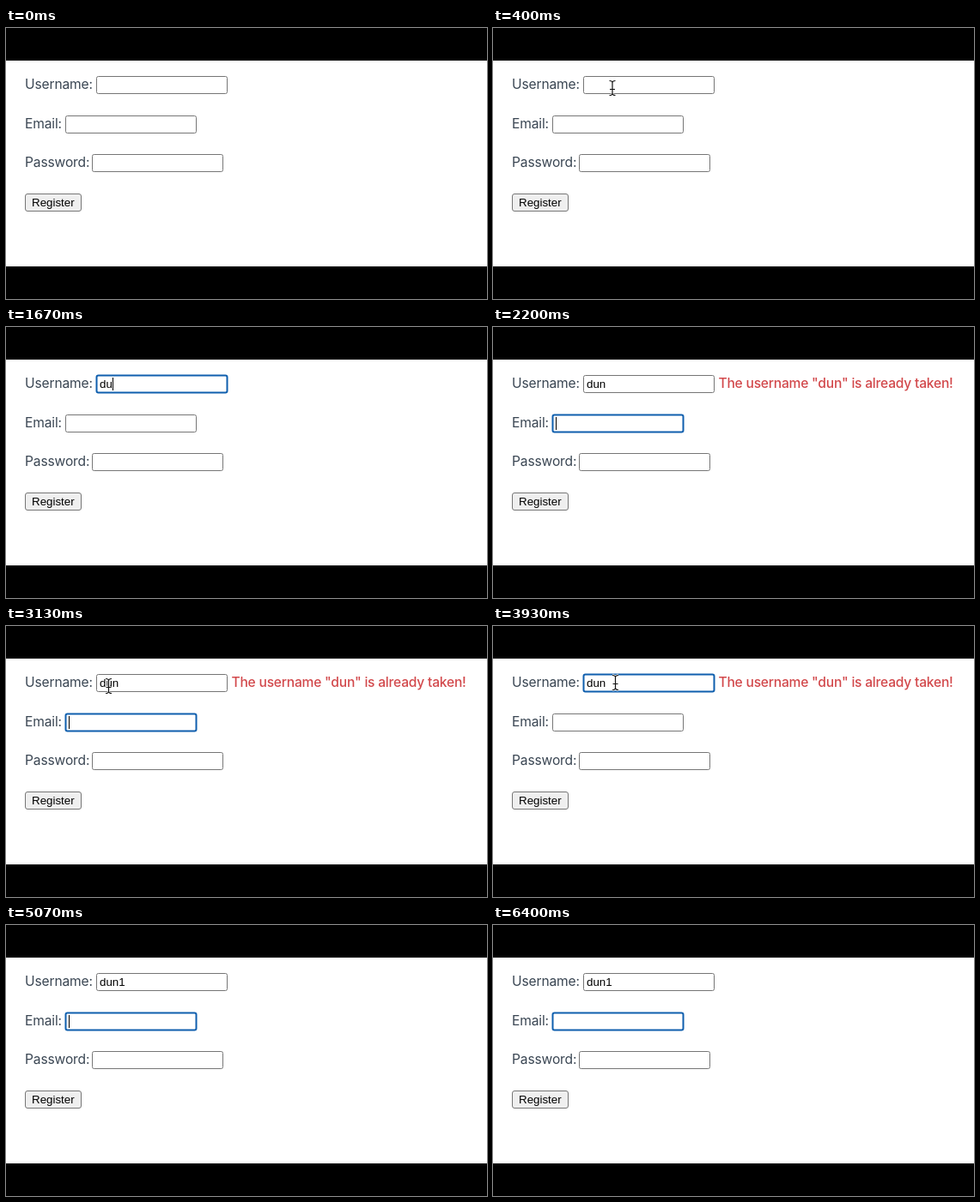
Write an HTML page that moves like this. It is 560x316 px and loops after 6.8 s.

```html
<!DOCTYPE html>
<html lang="en">
<head>
<meta charset="utf-8">
<title>Register form</title>
<style>
html, body { margin: 0; width: 100%; height: 100%; overflow: hidden; background: #000; }
svg { display: block; width: 560px; height: 316px; }
.label { font: 15.6px Inter, sans-serif; letter-spacing: -.15px; fill: #3a4653; }
.error { font-weight: 500; fill: #d2484b; letter-spacing: -.22px; }
.ui { font: 13.33px "Liberation Sans", Arial, sans-serif; fill: #000; }
.field { fill: #fff; stroke: #767676; }
.field.focus { stroke: #0f5fae; stroke-width: 2; }
</style>
</head>
<body>
<svg viewBox="0 0 560 316">
  <rect y="38" width="560" height="240" fill="#fff"/>
  <g class="label">
    <text x="22" y="71">Username:</text>
    <text x="22" y="117">Email:</text>
    <text x="22" y="162">Password:</text>
    <text id="error" class="error" x="262.5" y="71">The username "dun" is already taken!</text>
  </g>
  <rect id="username" class="field" x="105.5" y="56.5" width="152" height="20" rx="2"/>
  <rect id="email" class="field" x="69.5" y="102.5" width="152" height="20" rx="2"/>
  <rect class="field" x="100.5" y="147.5" width="152" height="20" rx="2"/>
  <rect x="22.5" y="193.5" width="65" height="20" rx="2.5" fill="#efefef" stroke="#767676"/>
  <text class="ui" x="30" y="208">Register</text>
  <text id="value" class="ui" x="109" y="71"></text>
  <rect id="caret" width="1" height="15"/>
  <path id="arrow" d="M0 0V15L3.4 11.8L6 17.4L8.6 16.2L6.1 10.9H10.7Z" stroke="#fff"/>
  <g id="beam" fill="none">
    <path d="M-3.5-8.5Q0-8.5 0-6Q0-8.5 3.5-8.5M0-6.5V6.5M-3 1.5H3M-3.5 8.5Q0 8.5 0 6Q0 8.5 3.5 8.5" stroke="#fff" stroke-width="2.4"/>
    <path d="M-3.5-8.5Q0-8.5 0-6Q0-8.5 3.5-8.5M0-6.5V6.5M-3 1.5H3M-3.5 8.5Q0 8.5 0 6Q0 8.5 3.5 8.5" stroke="#111" stroke-width="1.2"/>
  </g>
</svg>
<script>
const LOOP = 6800;
const $ = id => document.getElementById(id);

// Each track holds its value until the next time.
const typed = [[0, ""], [1330, "d"], [1670, "du"], [1800, "dun"], [4330, "dun1"]];
const focus = [[0, ""], [670, "username"], [2000, "email"], [3400, "username"], [4870, "email"]];
const error = [[0, false], [2200, true], [5070, false]];
const caret = [[0, false], [670, true], [1130, false], [1330, true], [2530, false], [3000, true],
  [3930, false], [4330, true], [5400, false], [5870, true], [6400, false]];
const pointer = [[0],
  [200, "arrow", 145, 38], [270, "beam", 142, 60], [330, "beam", 140, 68], [400, "beam", 139, 70],
  [800, "beam", 139, 66], [870, "arrow", 140, 50], [930, "arrow", 140.5, 46], [1000, "arrow", 141, 45],
  [1330],
  [2730, "arrow", 140, 45], [2800, "arrow", 136, 49], [2870, "beam", 130, 60], [2930, "beam", 125, 65],
  [3000, "beam", 121, 69], [3070, "beam", 119, 70], [3130, "beam", 119.5, 70], [3200, "beam", 126, 69],
  [3270, "beam", 136, 67], [3330, "beam", 143, 66], [3400, "beam", 144, 66], [3670, "beam", 142.5, 66],
  [4330],
  [4400, "beam", 143, 68], [4470, "arrow", 147, 78], [4530, "arrow", 150, 82],
  [4600, "arrow", 151, 84], [4670, "arrow", 151.5, 85],
  [4870, "arrow", 151, 62], [4930, "arrow", 150, 46], [5000]];

const at = (track, t) => track.findLast(k => k[0] <= t);
const show = (id, on) => $(id).style.display = on ? "" : "none";

function draw(t) {
  const text = at(typed, t)[1], active = at(focus, t)[1];
  $("value").textContent = text;
  for (const id of ["username", "email"]) $(id).classList.toggle("focus", id === active);
  show("error", at(error, t)[1]);

  show("caret", at(caret, t)[1]);
  const inEmail = active === "email";
  const end = text ? $("value").getComputedTextLength() : 0;
  $("caret").setAttribute("x", inEmail ? 73 : Math.round(109 + end));
  $("caret").setAttribute("y", inEmail ? 105 : 59);

  const [, shape, x, y] = at(pointer, t);
  for (const id of ["arrow", "beam"]) {
    show(id, id === shape);
    if (id === shape) $(id).setAttribute("transform", `translate(${x} ${y})`);
  }
}

const start = performance.now();
function tick() {
  draw((performance.now() - start) % LOOP);
  requestAnimationFrame(tick);
}
tick();
</script>
</body>
</html>
```
